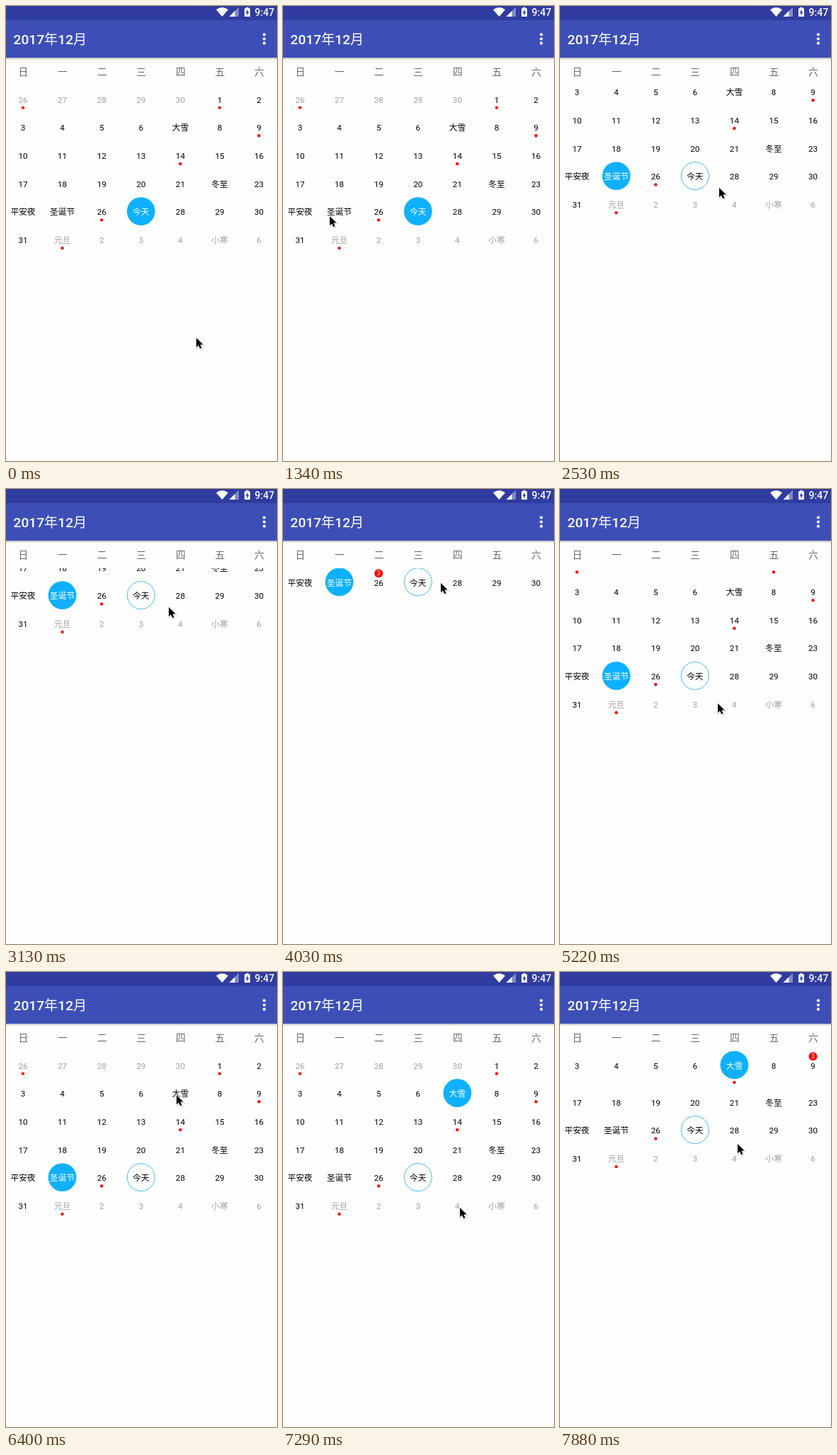
Recreate the animation shown at these times as an HTML page. Size 383 by 643 pixels, loop 8000 ms.

```html
<!DOCTYPE html>
<html lang="zh-CN">
<head>
<meta charset="utf-8">
<title>Calendar</title>
<style>
html, body { margin: 0; width: 100%; height: 100%; overflow: hidden; background: #fefefe; }
svg { display: block; width: 383px; height: 643px; font-family: Roboto, "Noto Sans CJK SC", "Noto Sans CJK", sans-serif; }
.head { font-size: 13.8px; fill: #6a6a6a; text-anchor: middle; }
.day { font-size: 11.7px; fill: #000; text-anchor: middle; }
.muted { fill: #9f9f98; }
.light { fill: #fff; }
.badge { font-size: 8.5px; fill: #fff; text-anchor: middle; }
.disc { fill: #0fb0ff; }
.ring { fill: none; stroke: #45b9f3; stroke-width: 1; }
.dot { fill: #f00; }
</style>
</head>
<body>
<svg viewBox="0 0 383 643">
  <defs>
    <clipPath id="area"><rect y="112" width="383" height="531"/></clipPath>
    <linearGradient id="shade" x2="0" y2="1">
      <stop stop-color="#000" stop-opacity=".3"/>
      <stop offset="1" stop-color="#000" stop-opacity="0"/>
    </linearGradient>
  </defs>
  <rect width="383" height="643" fill="#fefefe"/>
  <g clip-path="url(#area)">
    <g id="month"></g>
    <g id="week"></g>
  </g>
  <g id="heads"></g>

  <rect y="72.5" width="383" height="4" fill="url(#shade)"/>
  <rect width="383" height="73" fill="#3d4fb7"/>
  <rect width="383" height="20" fill="#303c9f"/>
  <text x="10.6" y="53.8" font-size="19.15" fill="#fff"><tspan font-weight="500">2017</tspan>年<tspan font-weight="500">12</tspan>月</text>
  <g fill="#fff">
    <circle cx="365" cy="40.3" r="2.1"/>
    <circle cx="365" cy="46.5" r="2.1"/>
    <circle cx="365" cy="52.7" r="2.1"/>
    <path d="M297 5.2Q305.5-1 314 5.2L305.5 15Z"/>
    <path d="M329 1.5V15H315.5Z" opacity=".4"/>
    <path d="M323.5 7V15H315.5Z"/>
    <path d="M337 3.2H339.3V1.8H342.7V3.2H345V15H337Z"/>
    <path d="M341.7 4.8L338.6 9.8H340.5V13.4L343.5 8.4H341.7Z" fill="#303c9f"/>
    <text x="351.6" y="14" font-size="14" font-weight="500">9:47</text>
  </g>

  <g id="cursor">
    <path d="M1 2V15.3L4 12.5L6.2 17.3L8.5 16.3L6.4 11.6H10.6Z" transform="translate(.8 1)" fill="#000" stroke="#000" stroke-width="2" opacity=".16"/>
    <path d="M1 2V15.3L4 12.5L6.2 17.3L8.5 16.3L6.4 11.6H10.6Z" fill="#000" stroke="#fff" stroke-width="1.8" stroke-linejoin="round" paint-order="stroke"/>
  </g>
</svg>
<script>
const LOOP = 8000, TOP = 132.3, PITCH = 39.7;
const names = { 11: '大雪', 26: '冬至', 28: '平安夜', 29: '圣诞节', 31: '今天', 36: '元旦', 40: '小寒' };
const marked = [0, 5, 13, 18, 30, 36];
const today = 31;

// time, x, y
const pointer = [
  [0, 268, 467], [297, 268, 467], [1335, 65, 295], [1630, 65, 295],
  [1930, 220, 334], [2080, 220, 334], [2530, 224, 255], [3130, 229, 165],
  [3580, 231, 118], [3730, 228, 113], [4180, 219, 140], [4630, 220, 199],
  [5365, 222, 326], [5513, 222, 334], [5661, 224, 325], [6399, 240, 172],
  [6547, 240, 172], [7138, 248, 325], [7286, 249, 331], [7728, 250, 261],
  [7876, 250, 241]
];
// time, month offset
const scroll = [
  [2230, 0], [2530, -50], [3130, -140], [3580, -190], [3730, -198.5],
  [4180, -198.5], [4630, -130], [5365, 0], [7434, 0], [7728, -47], [7876, -67]
];
// time, selected cell
const picks = [[0, today], [1630, 29], [6540, 11]];
// time, tick length
const ticks = [[0, 148.3], [1630, 150], [5070, 147.7]];

const $ = id => document.getElementById(id);
const colX = c => 24 + c * 55.6;
const last = (table, t) => table.filter(k => k[0] <= t).pop();

function at(keys, t, n) {
  const i = keys.findIndex(k => k[0] > t);
  if (i < 0) return keys[keys.length - 1][n];
  if (!i) return keys[0][n];
  const a = keys[i - 1], b = keys[i];
  return a[n] + (b[n] - a[n]) * (t - a[0]) / (b[0] - a[0]);
}

function snap(t) {
  const [start, step] = last(ticks, t);
  return start + Math.floor((t - start) / step) * step;
}

function dayName(i) {
  return names[i] || (i < 5 ? 26 + i : i > 35 ? i - 35 : i - 4);
}

function cell(i, y, sel, inWeek) {
  const x = colX(i % 7), muted = i < 5 || i > 35;
  let out = '';
  if (i === sel) out += `<circle class="disc" cx="${x}" cy="${y - 1}" r="19.9"/>`;
  else if (i === today) out += `<circle class="ring" cx="${x}" cy="${y - 1}" r="19.5"/>`;
  const tone = i === sel ? 'light' : muted ? 'muted' : '';
  out += `<text class="day ${tone}" x="${x}" y="${y + 4.2}">${dayName(i)}</text>`;
  if (marked.includes(i)) {
    out += inWeek
      ? `<circle class="dot" cx="${x}" cy="${y - 13}" r="6"/><text class="badge" x="${x}" y="${y - 9.9}">3</text>`
      : `<circle class="dot" cx="${x}" cy="${y + 11.3}" r="2.2"/>`;
  }
  return out;
}

function build(sel) {
  let month = '', week = '<rect y="112" width="383" height="40" fill="#fefefe"/>';
  const row = Math.floor(sel / 7);
  for (let i = 0; i < 42; i++) {
    const r = Math.floor(i / 7);
    month += cell(i, TOP + r * PITCH, sel, false);
    if (r === row) week += cell(i, TOP, sel, true);
  }
  $('month').innerHTML = month;
  $('week').innerHTML = week;
}

$('heads').innerHTML = [...'日一二三四五六'].map((s, c) =>
  `<text class="head" x="${colX(c) + .4}" y="97.8">${s}</text>`).join('');

let shown = -1;
function draw(now) {
  const t = snap(now % LOOP);
  const sel = last(picks, t)[1];
  if (sel !== shown) build(shown = sel);
  const shift = at(scroll, t, 1);
  const pinned = shift <= -Math.floor(sel / 7) * PITCH;
  $('month').setAttribute('transform', `translate(0 ${shift.toFixed(1)})`);
  $('week').setAttribute('display', pinned ? 'inline' : 'none');
  $('cursor').setAttribute('transform',
    `translate(${Math.round(at(pointer, t, 1))} ${Math.round(at(pointer, t, 2))})`);
}

const begin = performance.now();
function frame() {
  draw(performance.now() - begin);
  requestAnimationFrame(frame);
}
frame();
</script>
</body>
</html>
```
